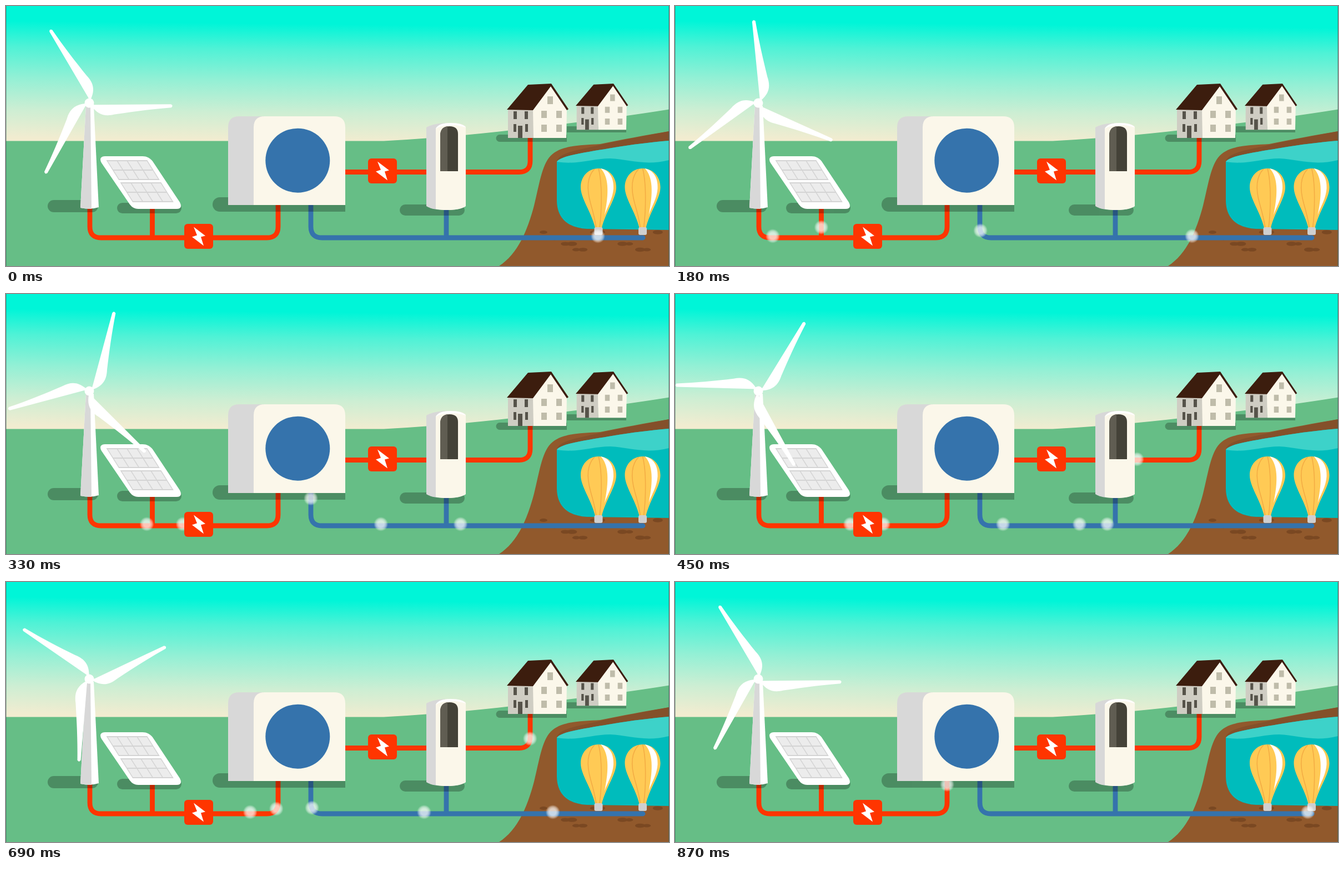
Recreate the animation shown at these times as an HTML page. Size 1194 by 469 pixels, loop 900 ms.

```html
<!DOCTYPE html>
<html lang="en">
<head>
<meta charset="utf-8">
<title>Renewable heating</title>
<style>
  html, body { margin: 0; width: 100%; height: 100%; overflow: hidden; background: #66be86; }
  svg { display: block; width: 100%; height: 100%; }
  .pipe { fill: none; stroke-width: 8.8; }
  .red { stroke: #ff3500; }
  .blue { stroke: #3573ac; }
  .shadow { fill: #000; opacity: .26; }
  .white { fill: #fff; }
  .cream { fill: #fbf7ea; }
  .grey { fill: #d8d8d8; }
</style>
</head>
<body>
<svg viewBox="0 0 1194 469" preserveAspectRatio="none">
  <defs>
    <linearGradient id="sky" gradientUnits="userSpaceOnUse" x1="0" y1="0" x2="-2.6" y2="243">
      <stop offset=".11" stop-color="#00f5d8"/>
      <stop offset=".3" stop-color="#4ff2d6"/>
      <stop offset=".53" stop-color="#92f0d5"/>
      <stop offset=".77" stop-color="#cdeed3"/>
      <stop offset=".98" stop-color="#f2ecd0"/>
    </linearGradient>
    <radialGradient id="glow">
      <stop offset=".45" stop-color="#fff" stop-opacity=".72"/>
      <stop offset=".7" stop-color="#fff" stop-opacity=".52"/>
      <stop offset="1" stop-color="#fff" stop-opacity="0"/>
    </radialGradient>
    <path id="blade" class="white" d="M2 0L3 -10L-3 -147Q-1 -152 3 -148C7 -112 13 -78 19 -46C24 -28 20 -16 6 -5Z"/>
    <g id="house">
      <path fill="#cfcdc3" d="M904 186H950V238H904Z"/>
      <path class="cream" d="M949 187L981 143L1010 186L1009 238H950Z"/>
      <path fill="#3c1d0e" d="M902 187L940 142L982 140L1013 186L1010 188L981 145L949 188Z"/>
      <path fill="#56534a" d="M914 190h6v14h-6zM934 190h6v14h-6zM914 213h5v14h-5zM935 213h5v14h-5zM922 216h8v22h-8z"/>
      <path fill="#bfbcaa" d="M975 163h10v14h-10zM964 189h10v13h-10zM991 189h10v13h-10zM964 214h10v13h-10zM991 214h10v13h-10z"/>
    </g>
    <g id="balloon">
      <path fill="#ffca55" d="M1067 293C1086 293 1099 308 1099 327C1099 347 1080 371 1073 400H1061C1054 371 1035 347 1035 327C1035 308 1048 293 1067 293Z"/>
      <path class="white" d="M1071 293C1087 296 1095 311 1094 329C1093 347 1083 362 1078 377C1082 356 1084 341 1083 325C1082 311 1078 300 1071 293Z"/>
      <path fill="none" stroke="#f3ab43" stroke-width="1.5" d="M1060 294C1046 308 1046 332 1053 357Q1060 381 1063 400M1067 293C1074 320 1073 368 1069 400"/>
      <rect x="1059.500" y="399" width="15" height="14" rx="3" fill="#cfcfcf"/>
    </g>
    <g id="power">
      <rect x="-26" y="-22.500" width="52" height="45" rx="6" fill="#ff3500"/>
      <path class="white" d="M-9 -17L12 -1L4 1L9 17L-12 1L-3 -2Z"/>
    </g>
    <g id="cells">
      <path fill="#ececec" d="M0 0H72V34H0Z"/>
      <path fill="none" stroke="#d4d4d4" stroke-width="1.8" d="M0 0H72V34H0ZM18 0V34M36 0V34M54 0V34M0 17H72"/>
    </g>
  </defs>

  <path fill="url(#sky)" d="M0 0H1194V250H0Z"/>
  <path fill="#66be86" d="M0 243.500H680C790 238 900 226 1010 212Q1110 200 1194 186.500V469H0Z"/>

  <!-- lake and soil -->
  <path fill="#91592c" d="M888 469C922 447 939 405 951 360C960 324 965 286 981 270C999 252 1030 251 1070 249C1110 241 1150 233 1194 226V469Z"/>
  <path fill="#84502a" d="M992 282C992 262 1050 257 1080 248C1120 240 1155 233 1194 226V246L1080 262Z"/>
  <path fill="#00bcbc" d="M992 281C998 270 1050 263 1085 257C1125 250 1160 246 1194 243V404L1046 402C1012 400 992 383 992 350Z"/>
  <path fill="#3dd2c9" d="M992 281C998 270 1050 263 1085 257C1125 250 1160 246 1194 243V278C1150 289 1120 276 1088 275C1055 275 1030 287 992 281Z"/>
  <g id="stones" fill="#7a4822"></g>

  <path class="pipe blue" stroke-linecap="round" d="M549 355V398Q549 418 569 418H1147M793 364V418"/>
  <path class="pipe red" d="M151 362V398Q151 418 171 418H470Q490 418 490 398V355M263.500 362V418M608 299.500H924Q944 299.500 944 279.500V236"/>

  <g class="shadow">
    <rect x="75" y="350" width="91" height="22" rx="11"/>
    <rect x="200" y="355" width="116" height="19" rx="9.500"/>
    <path d="M385 345H611V371H385A13 13 0 0 1 385 345Z"/>
    <rect x="709" y="358" width="117" height="20" rx="10"/>
    <path d="M889 232H1010V245H889A6.500 6.500 0 0 1 889 232ZM1010 217H1117V228H1010Z"/>
  </g>

  <use href="#balloon"/>
  <use href="#balloon" x="79.500"/>
  <g id="dots"></g>

  <!-- wind turbine tower -->
  <path class="white" d="M144 180H158L167 363Q152 368 134 364Z"/>
  <path class="grey" d="M144 180H152L154 366Q143 366 134 364Z"/>

  <!-- solar panel -->
  <path class="white" d="M178 271H246Q257 271 264 280L313 354Q319 366 307 366H238Q229 366 223 358L172 283Q166 272 178 271Z"/>
  <use href="#cells" transform="matrix(1 0 .63 1 182 279)"/>
  <use href="#cells" transform="matrix(1 0 .63 1 207 319)"/>

  <!-- heat pump -->
  <path class="grey" d="M400 359V219Q400 199 420 199H470V359Z"/>
  <path class="cream" d="M446 359V219Q446 199 466 199H591Q611 199 611 219V359Z"/>
  <circle cx="525.300" cy="278.700" r="58" fill="#3573ac"/>

  <!-- storage tank -->
  <path class="grey" d="M757 219Q770 211 800 211Q822 211 828 218V361Q818 368 795 368Q767 368 757 361Z"/>
  <path class="cream" d="M774 221Q781 211 800 211Q822 211 828 218V361Q818 368 795 368Q782 368 774 366Z"/>
  <path class="white" d="M774 221Q779 211 800 211Q822 211 828 219Q814 215 808 215Q785 214 774 221Z"/>
  <path fill="#444238" d="M782 298V234Q782 217 799 217Q814 217 814 231V298Z"/>
  <path fill="#605d52" d="M782 298V234Q782 219 795 217V298Z"/>

  <use href="#house"/>
  <use href="#house" transform="translate(1026 140) scale(.85) translate(-902 -140)"/>
  <use href="#power" x="347" y="415.500"/>
  <use href="#power" x="678" y="297.500"/>

  <g id="rotor">
    <use href="#blade"/>
    <use href="#blade" transform="rotate(120)"/>
    <use href="#blade" transform="rotate(240)"/>
    <circle class="white" r="8.500"/>
  </g>
  <path fill="#1d5b4d" opacity=".45" d="M0 0H1V469H0ZM1193 0H1194V469H1193Z"/>
</svg>
<script>
const LOOP = 900, STEP = 30, LAST = LOOP - STEP;

// Each dot follows its path at constant speed (px per ms) from its start time.
const intoPump = "H470Q490 415 490 398V364";
const outOfPump = "M549 345V398Q549 415 569 415";
const routes = [
  { d: "M151 340V398Q151 415 171 415" + intoPump, start: 0, speed: 0.517 },
  { d: "M263.5 352V415" + intoPump, start: 80, speed: 0.472 },
  { d: "M1066 415H569Q549 415 549 398V345", start: 0, speed: 0.75 },
  { d: outOfPump + "H1150", start: 110, speed: 0.86 },
  { d: outOfPump + "H773Q793 415 793 398V345", start: 295, speed: 0.676 },
  { d: "M800 298H924Q944 298 944 278V225", start: 386, speed: 0.5 }
];

function add(parent, tag, attrs) {
  const node = document.createElementNS("http://www.w3.org/2000/svg", tag);
  for (const name in attrs) node.setAttribute(name, attrs[name]);
  return document.getElementById(parent).appendChild(node);
}

for (let i = 0; i < 16; i++) {
  const rx = 7 + i % 3;
  add("stones", "ellipse", {
    cx: 968 + 218 * (i * 0.618 % 1), cy: 408 + i % 4 * 10.5, rx, ry: rx * 0.42
  });
}

const dots = routes.map(({ d, start, speed }) => {
  const path = document.createElementNS("http://www.w3.org/2000/svg", "path");
  path.setAttribute("d", d);
  const node = add("dots", "circle", { r: 13, fill: "url(#glow)" });
  return { path, length: path.getTotalLength(), start, speed, node };
});
const rotor = document.getElementById("rotor");
const origin = performance.now();

function draw() {
  const elapsed = Math.max(0, performance.now() - origin) % LOOP;
  const time = Math.floor(elapsed / STEP) * STEP;
  rotor.setAttribute("transform", `translate(150 175) rotate(${-28 + 120 * time / LAST})`);
  for (const { path, length, start, speed, node } of dots) {
    const travelled = (time - start) * speed;
    const active = travelled >= 0 && travelled <= length;
    node.setAttribute("visibility", active ? "visible" : "hidden");
    if (active) {
      const { x, y } = path.getPointAtLength(travelled);
      node.setAttribute("transform", `translate(${x} ${y})`);
    }
  }
  requestAnimationFrame(draw);
}
draw();
</script>
</body>
</html>
```
